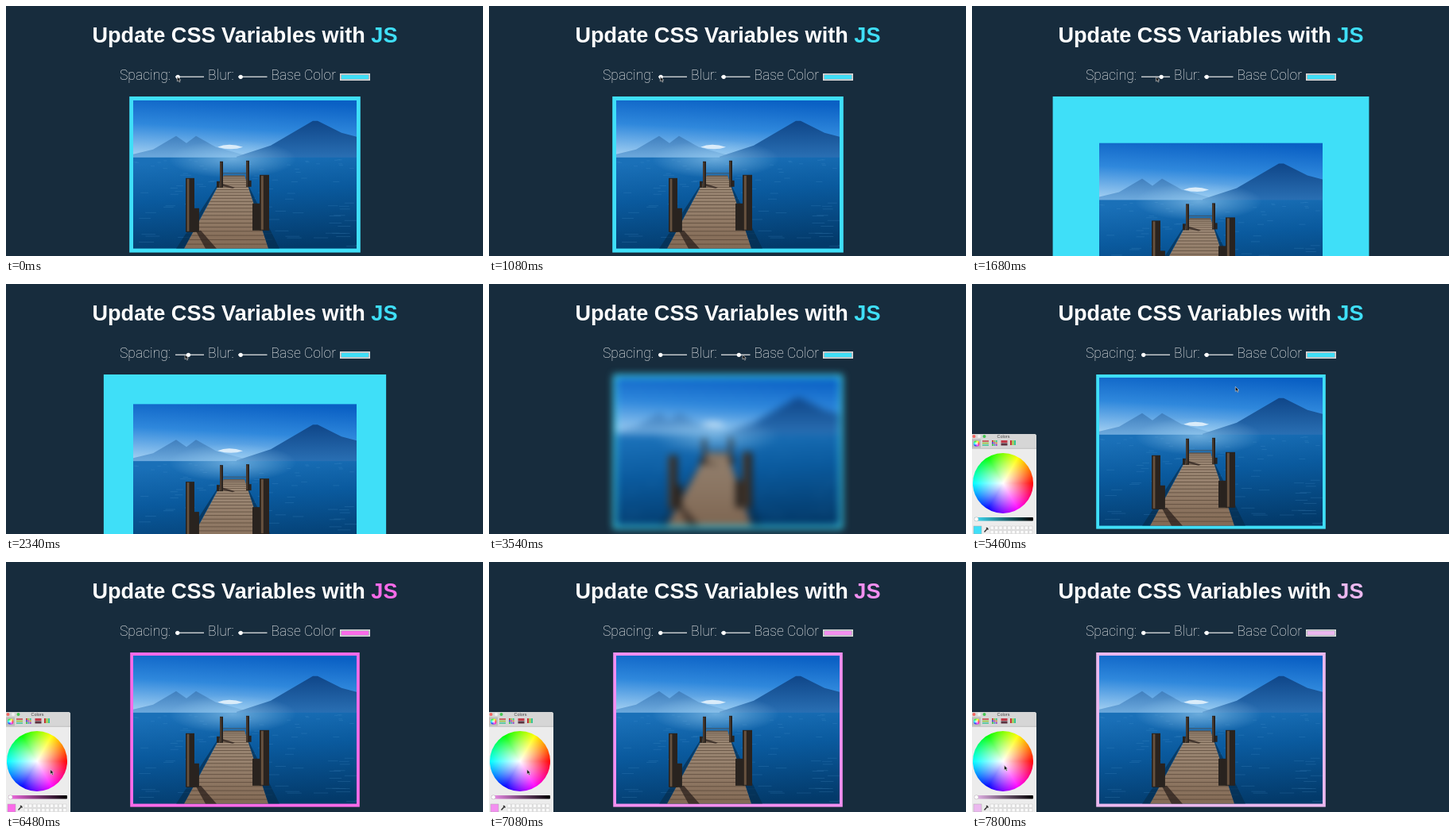
Animation of 600x315 px, one loop 7.86 s. Source, as an HTML page:

```html
<!DOCTYPE html>
<html lang="en">
<head>
<meta charset="utf-8">
<title>Update CSS Variables with JS</title>
<style>
  html, body { margin: 0; width: 100%; height: 100%; overflow: hidden; background: #172c3d; }
  #stage { display: block; width: 600px; height: 315px; }
  .title { font: bold 27.1px "Liberation Sans", Arial, sans-serif; fill: #fff; }
  .label { font: 200 17.5px Roboto, Inter, sans-serif; fill: #fff; }
  .base { fill: var(--base); }
  .track { stroke: #c3c8cc; stroke-width: 1.6; }
  .wheel {
    width: 76px; height: 76px; border-radius: 50%;
    background: radial-gradient(closest-side, #fff, #fff0),
      conic-gradient(from 90deg, red, magenta, blue, cyan, lime, yellow, red);
  }
</style>
</head>
<body>
<svg id="stage" viewBox="0 0 600 315">
  <defs>
    <linearGradient id="sky" x1=".65" y1="0" x2=".45" y2="1">
      <stop offset="0" stop-color="#0a60c4"/><stop offset=".5" stop-color="#2f88dc"/><stop offset="1" stop-color="#9ccbf0"/>
    </linearGradient>
    <linearGradient id="water" x1=".4" y1="0" x2=".6" y2="1">
      <stop offset="0" stop-color="#1a70b8"/><stop offset=".4" stop-color="#0a5a9e"/><stop offset="1" stop-color="#033a6a"/>
    </linearGradient>
    <linearGradient id="near" x1="0" y1="0" x2="0" y2="1">
      <stop offset="0" stop-color="#0f4689"/><stop offset="1" stop-color="#2a70b4"/>
    </linearGradient>
    <linearGradient id="far" x1="0" y1="0" x2="0" y2="1">
      <stop offset="0" stop-color="#3f7fbe"/><stop offset="1" stop-color="#6fabde"/>
    </linearGradient>
    <linearGradient id="wood" x1="0" y1="0" x2="0" y2="1">
      <stop offset="0" stop-color="#a4917e"/><stop offset="1" stop-color="#836a55"/>
    </linearGradient>
    <radialGradient id="glow">
      <stop offset="0" stop-color="#9fd2f4" stop-opacity=".6"/><stop offset="1" stop-color="#9fd2f4" stop-opacity="0"/>
    </radialGradient>
    <linearGradient id="shade">
      <stop offset="0" style="stop-color:var(--base)"/><stop offset="1"/>
    </linearGradient>
  </defs>

  <text class="title" x="108.5" y="46">Update CSS Variables with <tspan class="base">JS</tspan></text>
  <text class="label" x="143" y="92.5">Spacing:</text>
  <text class="label" x="254" y="92.5">Blur:</text>
  <text class="label" x="333.5" y="92.5">Base Color</text>
  <path class="track" d="M213 89.3H249M292 89.3H328.5"/>
  <circle id="spaceThumb" cy="89.3" r="2.6" fill="#fff"/>
  <circle id="blurThumb" cy="89.3" r="2.6" fill="#fff"/>
  <rect x="420" y="85" width="38" height="9" fill="#dcdcdc"/>
  <rect x="421.5" y="86.5" width="35" height="6" fill="#8d999f"/>
  <rect class="base" x="422" y="87" width="34" height="5"/>

  <g id="picture">
    <rect id="frame" class="base" y="114"/>
    <svg id="photo" x="160" width="281" height="187">
      <rect width="281" height="74" fill="url(#sky)"/>
      <path fill="#fff" opacity=".85" d="M106 59Q120 53 138 59Q124 64 106 59Z"/>
      <path fill="url(#far)" d="M0 68L25 62L54 45L67 54L79 45L104 59L140 69V73H0Z"/>
      <path fill="url(#near)" d="M130 71L173 57L226 26H232L262 41L281 46V73H130Z"/>
      <rect y="72" width="281" height="115" fill="url(#water)"/>
      <path id="ripples" stroke-width=".7" stroke="#5aa2d8" opacity=".28"/>
      <ellipse cx="125" cy="74" rx="80" ry="24" fill="url(#glow)"/>
      <path fill="#052a48" opacity=".6" d="M112 97L64 187H54ZM140 97L170 187H184Z"/>
      <path fill="url(#wood)" d="M114 95H140L170 187H64Z"/>
      <path id="planks" stroke="#503f32" stroke-width=".9" opacity=".7"/>
      <path stroke="#4b4440" stroke-width=".7" d="M111 92H144"/>
      <path fill="#2b211c" opacity=".75" d="M79 165L85 164L105 187H91ZM112 105L128 110L125 111L111 108Z"/>
      <g id="posts" fill="#29231f"></g>
    </svg>
  </g>

  <g id="panel">
    <path fill="#ececec" d="M0 189H78Q81 189 81 192V315H0Z"/>
    <path fill="#d6d6d6" d="M0 189H78Q81 189 81 192V207H0Z"/>
    <path stroke="#aeaeae" stroke-width=".7" d="M0 207.3H81"/>
    <circle cx="2.5" cy="192" r="2" fill="#f4655f"/>
    <circle cx="9" cy="192" r="2" fill="#f3f3f3"/>
    <circle cx="15.5" cy="192" r="2" fill="#45c653"/>
    <text x="39.5" y="194" text-anchor="middle" font-family="Liberation Sans, Arial, sans-serif" font-size="5.5" fill="#444">Colors</text>
    <rect y="195.5" width="11" height="11" fill="#bbb"/>
    <foreignObject width="76" height="76" transform="translate(2 197.2) scale(.1)"><div class="wheel"></div></foreignObject>
    <g id="icons"></g>
    <foreignObject x="1" y="212.5" width="76" height="76"><div class="wheel"></div></foreignObject>
    <rect x="3" y="294" width="74" height="4.5" rx="1" fill="url(#shade)"/>
    <circle cx="5.5" cy="296.3" r="2.6" fill="#fff" stroke="#aaa" stroke-width=".5"/>
    <rect class="base" x="2" y="305" width="10" height="10" stroke="#aaa" stroke-width=".5"/>
    <path stroke="#333" stroke-width="1.4" d="M15.5 312.5L20 307.5M18 307L20.5 309.5"/>
    <path id="wells" fill="#fafafa" stroke="#c4c4c4" stroke-width=".5"/>
  </g>

  <path id="cursor" d="M0 0V6L1.5 4.7L2.6 7L3.7 6.5L2.7 4.3H4.4Z" fill="#111" stroke="#ddd" stroke-width=".6"/>
</svg>

<script>
const LOOP = 7860, STEP = 60, PANEL_OPENS = 5280;
const $ = id => document.getElementById(id);
const set = (id, attrs) => {
  for (const name in attrs) $(id).setAttribute(name, attrs[name]);
};
const repeat = (n, make) => Array.from({ length: n }, (_, i) => make(i)).join("");
const rect = (x, y, w, h, fill) =>
  `<rect x="${x}" y="${y}" width="${w}" height="${h}"${fill ? ` fill="${fill}"` : ""}/>`;

const progress = (t, from, to) => Math.min(1, Math.max(0, (t - from) / (to - from)));
const ease = (t, from, to) => (1 - Math.cos(Math.PI * progress(t, from, to))) / 2;
// Rises from 0 to 1 and returns: a slider dragged up and back.
const drag = (t, from, to) => Math.sin(Math.PI * progress(t, from, to)) ** 2;

let seed = 7;
const random = () => (seed = seed * 16807 % 2147483647) / 2147483647;

// A tall post with a stub beside it, at the near and far ends of the pier.
const pair = (x, y, w, h, stubX, stubH) =>
  rect(x, y, w, h) + rect(x + stubX, y + h - stubH, w * 0.9, stubH) +
  rect(x + w * 0.15, y + 1, w * 0.25, h - 2, "#67523f");

function buildDetails() {
  set("ripples", { d: repeat(110, () => {
    const depth = random() ** 1.4;
    return `M${random() * 281} ${75 + depth * 110}h${4 + depth * 16}`;
  }) });
  set("planks", { d: repeat(24, i => {
    const k = (i / 24) ** 1.5;
    return `M${114 - 50 * k} ${95 + 92 * k}H${140 + 30 * k}`;
  }) });
  $("posts").innerHTML = pair(109, 77, 4, 33, -4, 8) + pair(142, 76, 4, 33, 3, 8) +
    pair(66, 98, 11, 68, 7, 30) + pair(159, 94, 12, 70, -9, 34);
  set("wells", { d: repeat(20, i =>
    `M${23 + i % 10 * 5.4} ${305 + (i / 10 | 0) * 5.4}h4.4v4.4h-4.4z`) });
  const hue = i => `hsl(${i * 80} 60% 48%)`;
  $("icons").innerHTML =
    repeat(3, i => rect(13, 197.3 + i * 2.5, 8, 1.4, hue(i))) +
    repeat(9, i => rect(25 + i % 3 * 2.4, 197 + (i / 3 | 0) * 2.4, 1.9, 1.9, hue(i))) +
    repeat(2, i => rect(36.5, 197 + i * 3.5, 8, 3, i ? "#5b3340" : "#c23b4a")) +
    repeat(3, i => rect(48 + i * 2.5, 197, 2, 6, hue(i)));
}

function draw(t) {
  const pad = 4.8 - ease(t, 2520, 2700) + 68 * drag(t, 1120, 2730);
  const radius = 6.7 * drag(t, 3060, 4560);
  const spaceX = 214.2 + pad * 0.41, blurX = 295.2 + radius * 4;

  // Colour choice: first out to pink, then in towards white.
  const pick = ease(t, 5820, 6480), fade = ease(t, 6480, 7800);
  const angle = (180 - 147 * pick + 42 * fade) * Math.PI / 180;
  const reach = 25 - 5 * pick - 14 * fade;
  const toWheel = ease(t, PANEL_OPENS, 5820);
  const barX = 215 + (spaceX - 216) * 0.73 + 80 * ease(t, 2700, 3060) +
    (blurX - 295) * 1.25 + 142 * ease(t, 4560, 4920);
  const wheelX = 39 + reach * Math.cos(angle), wheelY = 250.5 + reach * Math.sin(angle);
  const x = barX + (wheelX - barX) * toWheel, y = 89 + (wheelY - 89) * toWheel;

  document.body.style.setProperty("--base",
    `hsl(${188 + 119 * pick - 12 * fade} ${93 - 29 * fade}% ${61 + 9 * pick + 13 * fade}%)`);
  set("frame", { x: 160 - pad, width: 281 + 2 * pad, height: 187 + 2 * pad });
  set("photo", { y: 114 + pad });
  $("picture").style.filter = radius > 0.01 ? `blur(${radius}px)` : "none";
  set("spaceThumb", { cx: spaceX });
  set("blurThumb", { cx: blurX });
  set("cursor", { transform: `translate(${x} ${y})` });
  $("panel").style.display = t < PANEL_OPENS ? "none" : "";
}

function tick() {
  const t = performance.now() % LOOP;
  draw(Math.floor(t / STEP) * STEP);
  requestAnimationFrame(tick);
}

buildDetails();
tick();
</script>
</body>
</html>
```
